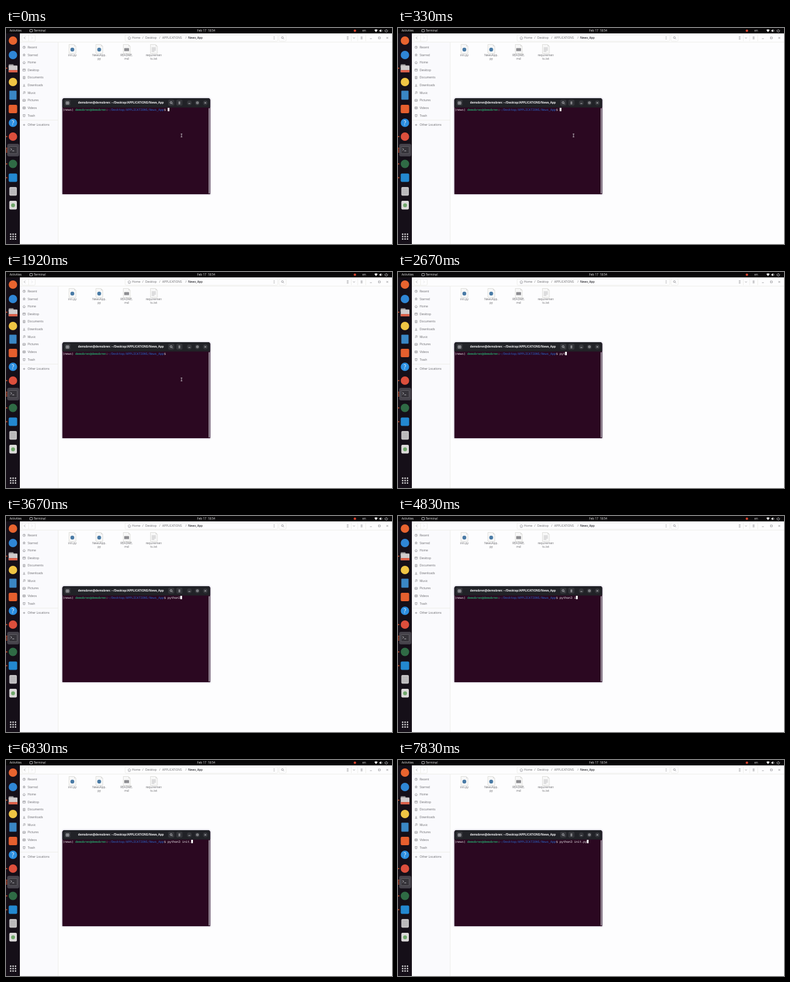
An HTML page that plays this animation: 640x360 px, repeating every 8 s.

```html
<!DOCTYPE html>
<html lang="en">
<head>
<meta charset="utf-8">
<title>Terminal session</title>
<style>
  html, body { margin: 0; width: 100%; height: 100%; overflow: hidden; background: #fdfdfe; }
  svg { display: block; width: 640px; height: 360px; }
  text { font: 4.85px "Open Sans", "Noto Sans", sans-serif; fill: #66666a; white-space: pre; }
  .bar text { fill: #f2f2f2; }
  .mid { text-anchor: middle; }
  .strong { fill: #333338; font-weight: 600; }
  .title { font-size: 4.75px; font-weight: 700; fill: #f2f2f4; text-anchor: middle; }
  .mono text { font: 4.98px "DejaVu Sans Mono", "Liberation Mono", monospace; fill: #f2eef2; }
  .mono .user { fill: #26a269; font-weight: 700; }
  .mono .path { fill: #2a4c9c; font-weight: 700; }
  .line { fill: none; stroke: #77777c; stroke-width: .6; }
  .pale { fill: none; stroke: #efefec; stroke-width: 1; }
  .light { fill: none; stroke: #e6e6ea; stroke-width: .7; }
  .window { filter: drop-shadow(0 .5px 1.8px rgba(70, 60, 110, .45)); }
</style>
</head>
<body>
<svg viewBox="0 0 640 360">
  <rect width="640" height="360" fill="#fdfdfe"/>
  <rect x="23" y="24" width="63" height="336" fill="#fafafd"/>
  <path class="pale" d="M23 23.5H640M86.5 24V360M24 153.5H86"/>

  <!-- file manager header -->
  <g>
    <rect class="pale" x="26.5" y="11.5" width="22" height="10.5" rx="2"/>
    <path class="pale" d="M37.5 12V22"/>
    <path class="line" d="M32 14.5L30 16.5L32 18.5"/>
    <path class="line" d="M42 14.5L44 16.5L42 18.5" opacity=".3"/>
    <rect class="pale" x="197.5" y="11.5" width="253" height="10.5" rx="2"/>
    <rect class="pale" x="452.5" y="11.5" width="12" height="10.5" rx="2"/>
    <path class="line" d="M202 16.5L204.5 14L207 16.5M203 16V19H206V16"/>
    <g id="crumbs"></g>
    <g fill="#66666a">
      <circle cx="444.5" cy="14.5" r=".5"/><circle cx="444.5" cy="16.5" r=".5"/><circle cx="444.5" cy="18.5" r=".5"/>
    </g>
    <circle class="line" cx="458.3" cy="16" r="1.6"/>
    <path class="line" d="M459.5 17.2L461 18.7"/>
    <path class="pale" d="M572.5 12V22M583 12V22M596.5 12V22"/>
    <path class="line" d="M565 14.5H568M565 16.5H568M565 18.5H568M575.5 15.8L577 17.3L578.5 15.8
      M588 14.8H591.2M588 16.5H591.2M588 18.2H591.2M603.5 17.8H606.5M617.5 15H620.5V18H617.5Z
      M630.7 15L633.7 18M633.7 15L630.7 18"/>
  </g>

  <g id="places"></g>
  <g id="files"></g>

  <!-- top bar -->
  <g class="bar">
    <rect width="640" height="9" fill="#080708"/>
    <text x="6" y="6.2">Activities</text>
    <rect class="light" x="39.5" y="2.5" width="4.5" height="4" rx=".6"/>
    <text x="46" y="6.2">Terminal</text>
    <text x="317" y="6.2">Feb 17  18:54</text>
    <circle cx="578.5" cy="4.5" r="2" fill="#d8432c"/>
    <text x="591" y="6.2">en</text>
    <path d="M610.8 3.2Q613.5 1.2 616.2 3.2L613.5 7Z" fill="#f2f2f2"/>
    <path d="M619 3.7H620.2L622 2V7L620.2 5.5H619Z" fill="#f2f2f2"/>
    <path class="light" d="M623 3.2Q624 4.5 623 5.8M629 3A2.2 2.2 0 1 0 632 3M630.5 2V4.5"/>
  </g>

  <!-- dock -->
  <rect y="9" width="23" height="351" fill="#150f18"/>
  <rect x="2" y="193" width="20" height="21" rx="3" fill="#45424a"/>
  <g id="dock"></g>

  <!-- terminal window -->
  <g class="window">
    <path d="M93.5 277V120.5Q93.5 117 97 117H335Q338.5 117 338.5 120.5V277Z" fill="#2b0821"/>
    <path d="M93.5 132.5V120.5Q93.5 117 97 117H335Q338.5 117 338.5 120.5V132.5Z" fill="#212227"/>
  </g>
  <rect x="336" y="133.5" width="1.6" height="142.5" rx=".8" fill="#b3adb6"/>
  <g fill="#34353a">
    <rect x="97" y="119.5" width="10" height="10" rx="2"/>
    <rect x="269" y="119.5" width="10" height="10" rx="2"/>
    <rect x="282.5" y="119.5" width="10" height="10" rx="2"/>
    <circle cx="304" cy="124.7" r="4"/><circle cx="317.3" cy="124.7" r="4"/><circle cx="330.5" cy="124.7" r="4"/>
  </g>
  <path class="light" d="M99.8 123H104.2V127H99.8ZM102 123.6V126.4M100.7 125H103.3
    M275 125.6L276.3 127M286 123.2H289M286 124.8H289M286 126.4H289
    M302.5 125.8H305.5M316 123.3H318.7V126H316ZM329.2 123.4L331.8 126M331.8 123.4L329.2 126"/>
  <circle class="light" cx="273.7" cy="124.3" r="1.6"/>
  <text class="title" x="190.5" y="126.4">demobren@demobren: ~/Desktop/APPLICATIONS/News_App</text>
  <g class="mono" id="prompt"></g>
  <rect id="caret" y="133" width="3" height="5.6" fill="#f4f2f4"/>
  <path id="pointer" class="light" d="M289.7 176.6H292.3M291 176.6V181.6M289.7 181.6H292.3"/>
</svg>
<script>
const NS = "http://www.w3.org/2000/svg";
const get = id => document.getElementById(id);

function add(parent, tag, attrs, content = "") {
  const node = document.createElementNS(NS, tag);
  for (const key in attrs) node.setAttribute(key, attrs[key]);
  node.textContent = content;
  parent.appendChild(node);
  return node;
}
const label = (parent, x, y, content, cls = "") =>
  add(parent, "text", { x, y, class: cls }, content);
const disc = (parent, cx, cy, r, fill) => add(parent, "circle", { cx, cy, r, fill });
const box = (parent, x, y, width, height, fill, rx = 1) =>
  add(parent, "rect", { x, y, width, height, fill, rx });

// Path bar
[[209, "Home"], [226, "/"], [231, "Desktop"], [254, "/"], [259, "APPLICATIONS"], [297.5, "/"]]
  .forEach(([x, word]) => label(get("crumbs"), x, 18.2, word));
label(get("crumbs"), 302, 18.2, "News_App", "strong");

// Sidebar, icons drawn around their own centre
const places = [
  ["Recent", "M-2 0A2 2 0 1 0 2 0A2 2 0 1 0-2 0M0-1.2V0H1"],
  ["Starred", "M0-2L.6-.6L2-.5L.9.4L1.3 1.9L0 1L-1.3 1.9L-.9.4L-2-.5L-.6-.6Z"],
  ["Home", "M-2 0L0-2L2 0M-1.3-.4V2H1.3V-.4"],
  ["Desktop", "M-2-1.8H2V1.8H-2ZM-2-.8H2"],
  ["Documents", "M-1.5-2H1.5V2H-1.5ZM-.7-.6H.7M-.7.6H.7"],
  ["Downloads", "M0-2V.8M-1.3-.4L0 .9L1.3-.4M-2 2H2"],
  ["Music", "M-.8 1.5V-1.8L1.5-2V1M-1.8 1.5H-.8M.5 1H1.5"],
  ["Pictures", "M-2-1.6H2V1.6H-2ZM-1.8 1.2L-.4-.2L.6.7L1.8-.4"],
  ["Videos", "M-2-1.6H2V1.6H-2ZM-1-1.6V1.6M1-1.6V1.6"],
  ["Trash", "M-2-1.5H2M-1.5-1.5L-1.2 2H1.2L1.5-1.5"]
];
function place(name, icon, y) {
  add(get("places"), "path", { class: "line", d: icon, transform: `translate(30 ${y})` });
  label(get("places"), 36, y + 1.7, name);
}
places.forEach(([name, icon], i) => place(name, icon, 32.2 + i * 12.63));
place("Other Locations", "M-1.8 0H1.8M0-1.8V1.8", 161.5);

// File icons
function file(x, lines, mark) {
  const g = get("files");
  add(g, "path", {
    d: `M${x - 5.5} 27.5H${x + 3}L${x + 6} 30.5V42.5H${x - 5.5}Z`,
    fill: "#f8f8f8", stroke: "#d6d6d2", "stroke-width": .7
  });
  add(g, "path", { d: `M${x + 3} 27.5V30.5H${x + 6}Z`, fill: "#d8d8d6" });
  mark(g, x);
  lines.forEach((word, i) => label(g, x, 47.3 + i * 6, word, "mid"));
}
const script = (g, x) => disc(g, x, 36, 3.2, "#4a7ba6");
const block = (g, x) => box(g, x - 4, 33.5, 8, 5, "#8e8e92", .6);
const rows = (g, x) => add(g, "path", {
  class: "line", opacity: .7,
  d: `M${x - 3.5} 33H${x + 3.5}M${x - 3.5} 35H${x + 3.5}M${x - 3.5} 37H${x + 3.5}M${x - 3.5} 39H${x + 1}`
});
file(110, ["init.py"], script);
file(154.5, ["NewsApp.", "py"], script);
file(200, ["README.", "md"], block);
file(245, ["requiremen", "ts.txt"], rows);

// Dock
const dock = get("dock");
[[21, "#e8642f"], [45, "#2f86d6"], [90, "#f0c544"], [181, "#dc4f3c"], [226.5, "#2f6b45"]]
  .forEach(([y, fill]) => disc(dock, 11.5, y, 7, fill));
box(dock, 5.5, 104.5, 12, 15, "#3a86c4");
box(dock, 4.5, 128, 14, 14, "#e65f2e", 2);
box(dock, 4.5, 242.5, 14, 14, "#2388d0", 2);
// folder
box(dock, 4.5, 60.5, 8, 6, "#9d9a9c");
box(dock, 4.5, 62.5, 14.5, 11.5, "#cfcbcc");
box(dock, 4.5, 70, 14.5, 4, "#d9604a");
// help
disc(dock, 11.5, 158, 7, "#2b8ee0");
add(dock, "text", { x: 11.5, y: 161.7, class: "mid", style: "font-size:10px;fill:#f6f6f8" }, "?");
// terminal
box(dock, 4.5, 197, 14.5, 13, "#5c5a60", 2);
box(dock, 5.5, 198, 12.5, 11, "#36343a");
add(dock, "path", { class: "light", d: "M7.5 200.5L9.5 202.3L7.5 204M10.5 204.8H13.5" });
// drive
box(dock, 5.5, 265, 12.5, 14.5, "#c2c0c2", 2);
add(dock, "path", { class: "line", d: "M7.5 269H16M7.5 272H16M7.5 275H16", opacity: .5 });
// bin
box(dock, 5.5, 288, 12.5, 14.5, "#dcdada", 2);
disc(dock, 11.7, 295.5, 3.2, "#6fa66a");
// app grid
for (let i = 0; i < 9; i++) box(dock, 6.6 + i % 3 * 4, 342.6 + (i / 3 | 0) * 4, 2.2, 2.2, "#f0f0f0", .5);
[67, 181, 200.5, 203.5, 206.5, 226.5, 249.5].forEach(y => disc(dock, 1.2, y, 1, "#e2562c"));

// Prompt on a fixed character grid
const cell = 3, left = 94, start = 58;
const column = n => left + n * cell;
const write = (col, word, cls) => label(get("prompt"), column(col), 137.5, word, cls);
write(0, "(news)");
write(7, "demobren@demobren", "user");
write(24, ":");
write(25, "~/Desktop/APPLICATIONS/News_App", "path");
write(56, "$");
const typed = write(start, "");

const command = "python3 init.py";
const keys = [2330, 2500, 2670, 2830, 3000, 3250, 3670, 4000, 4580, 5000, 5330, 5830, 6420, 7000, 7420];
const loop = 8000, blink = 600;
const caret = get("caret"), pointer = get("pointer");

function draw() {
  const t = performance.now() % loop;
  const count = keys.filter(k => k <= t).length;
  const text = command.slice(0, count);
  if (typed.textContent !== text) typed.textContent = text;
  // every key press restarts the blink; typing hides the pointer
  const idle = t - (count ? keys[count - 1] : 0);
  caret.setAttribute("x", column(start + count));
  caret.setAttribute("opacity", idle % (2 * blink) < blink ? 1 : 0);
  pointer.setAttribute("opacity", count ? 0 : 1);
  requestAnimationFrame(draw);
}
draw();
</script>
</body>
</html>
```
